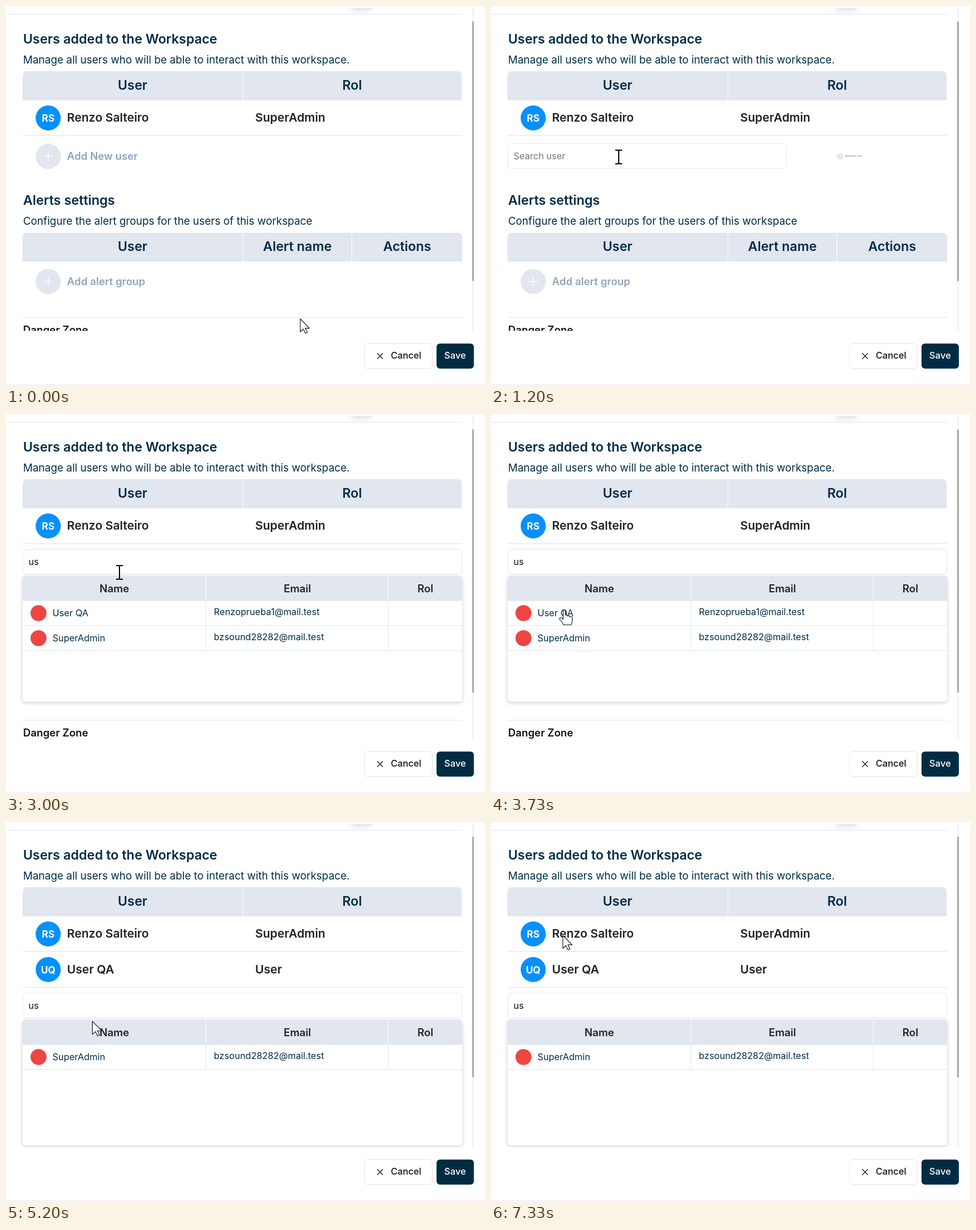
Recreate the animation shown at these times as an HTML page. Size 840x667 px, loop 7400 ms.

```html
<!DOCTYPE html>
<html lang="en">
<head>
<meta charset="utf-8">
<title>Workspace users</title>
<style>
  html, body { margin: 0; width: 100%; height: 100%; overflow: hidden; background: #fff; }
  #stage { display: block; width: 840px; height: 667px; }
  text { font: 400 16px Inter, "Open Sans", sans-serif; fill: #012b45; white-space: pre; }
  .title { font-size: 22.9px; font-weight: 600; }
  .lead { font-size: 18.5px; }
  .head { font-size: 22.8px; font-weight: 600; text-anchor: middle; }
  .person { font-size: 20.7px; font-weight: 600; fill: #212121; }
  .initials { font-weight: 700; font-size: 17px; fill: #fff; text-anchor: middle; }
  .add { font-size: 18.3px; font-weight: 600; fill: #94a3b8; }
  .danger { font-size: 18.3px; font-weight: 600; fill: #111; }
  .column { font-size: 18.4px; font-weight: 600; fill: #212529; text-anchor: middle; }
  .button { font-weight: 500; font-size: 16.2px; fill: #111; text-anchor: middle; }
  .band { fill: #e1e6ef; }
  .rule { stroke: #e1e5eb; fill: none; }
  .gap { stroke: #fff; }
  .plus { stroke: #fff; stroke-width: 1.4; }
  .avatar { fill: #0590ff; }
  .dot { fill: #ef4444; }
  .box { fill: #fff; stroke: #e1e6ef; }
  #menu > .panel { fill: #fff; filter: drop-shadow(0 2px 3px rgba(0, 0, 0, .2)); }
  #toggle { fill: #e4e4e4; filter: drop-shadow(-3px 4px 6px rgba(0, 0, 0, .07)); }
  #arrow, #hand { fill: #fff; stroke: #111; stroke-width: 1.1; stroke-linejoin: round; }
  #ibeam { fill: none; stroke: #000; stroke-width: 2; }
</style>
</head>
<body>
<svg id="stage" viewBox="0 0 840 667">
  <defs>
    <clipPath id="view"><rect y="4" width="840" height="566"/></clipPath>
    <g id="plus"><circle class="band" r="22"/><path class="plus" d="M-8 0H8M0-8V8"/></g>
  </defs>
  <rect width="840" height="667" fill="#fff"/>

  <g clip-path="url(#view)">
    <rect id="toggle" x="604" y="-15" width="41" height="22" rx="11"/>
    <path class="rule" d="M0 14.500H800"/>
    <text class="title" x="30" y="66">Users added to the Workspace</text>
    <text class="lead" x="30" y="101">Manage all users who will be able to interact with this workspace.</text>
    <path class="band" d="M29 165.500V122.500q0-8 8-8H791q8 0 8 8V165.500Z"/>
    <path class="gap" d="M415.500 114V166"/>
    <text class="head" x="222" y="147">User</text>
    <text class="head" x="607" y="147">Rol</text>

    <circle class="avatar" cx="74" cy="196.500" r="22"/>
    <text class="initials" x="74" y="203">RS</text>
    <text class="person" x="107" y="203">Renzo Salteiro</text>
    <text class="person" x="437" y="203">SuperAdmin</text>
    <path class="rule" d="M29 227.500H800"/>

    <g id="newRow">
      <circle class="avatar" cx="74" cy="259" r="22"/>
      <text class="initials" x="74" y="265.500">UQ</text>
      <text class="person" x="107" y="266">User QA</text>
      <text class="person" x="437" y="266">User</text>
      <path class="rule" d="M29 290.500H800"/>
    </g>

    <g id="addUser">
      <use href="#plus" x="74" y="264"/>
      <text class="add" x="107" y="270">Add New user</text>
    </g>

    <g id="lower">
      <text class="title" x="30" y="349">Alerts settings</text>
      <text class="lead" x="30" y="384">Configure the alert groups for the users of this workspace</text>
      <path class="band" d="M29 448.500V406q0-8 8-8H792q8 0 8 8V448.500Z"/>
      <path class="gap" d="M415.500 398V449M606.500 398V449"/>
      <text class="head" x="222" y="430">User</text>
      <text class="head" x="511" y="430">Alert name</text>
      <text class="head" x="703.500" y="430">Actions</text>
      <use href="#plus" x="74" y="483.500"/>
      <text class="add" x="107" y="490">Add alert group</text>
      <path class="rule" d="M29 546.500H800"/>
      <text class="danger" x="30" y="575">Danger Zone</text>
    </g>

    <svg id="field" x="29" height="45">
      <rect id="outline" class="box" x=".5" y=".5" height="43.500" rx="6"/>
      <text id="query" x="10.500" y="28"></text>
      <path id="caret" d="M0 11V33" stroke="#000"/>
    </svg>

    <g id="menu">
      <rect class="panel" x="29" y="284" width="771" height="221" rx="6"/>
      <path class="band" d="M29 328V290q0-6 6-6H794q6 0 6 6V328Z"/>
      <path class="gap" d="M350.500 284V328M670.500 284V328"/>
      <text class="column" x="190" y="313">Name</text>
      <text class="column" x="511" y="313">Email</text>
      <text class="column" x="735.500" y="313">Rol</text>
      <g id="match">
        <circle class="dot" cx="57" cy="349.500" r="14"/>
        <text x="81.500" y="355">User QA</text>
        <text x="364.500" y="353">Renzoprueba1@mail.test</text>
        <path class="rule" d="M29 371.500H800M350.500 328V372M670.500 328V372"/>
      </g>
      <g id="admin">
        <circle class="dot" cx="57" cy="393.500" r="14"/>
        <text x="81.500" y="399">SuperAdmin</text>
        <text x="364.500" y="397">bzsound28282@mail.test</text>
        <path class="rule" d="M29 415.500H800M350.500 372V416M670.500 372V416"/>
      </g>
    </g>

    <rect x="817" y="4" width="3.500" height="566" fill="#f3f4f6"/>
    <rect id="thumb" x="817.500" width="3" rx="1.500" fill="#a6a6a6"/>
  </g>

  <rect class="box" x="628.500" y="592.500" width="119" height="44" rx="6"/>
  <path d="M651 609.500l10 10m0-10l-10 10" stroke="#111" stroke-width="1.200"/>
  <text class="button" x="701.500" y="619">Cancel</text>
  <rect x="755" y="592.500" width="65.500" height="44" rx="6" fill="#012b42"/>
  <text class="button" x="787.500" y="619" style="fill:#fff">Save</text>
  <rect y="663" width="840" height="4" fill="#f5f6fa"/>

  <g id="pointer">
    <path id="arrow" d="M0 0V23L5.200 18 9 25.600 12.400 24.100 8.800 16.600H16.200Z"/>
    <path id="hand" d="M-2.500 2q0-2 2-2t2 2V9q4-1 4 1.500q4-1 4 1.500q4-1 4 2V19q0 3-2 7H-2q-1-3-6-9q-2-3 1-3.500q2 0 4.500 3Z"/>
    <path id="ibeam" d="M-6-12h4q2 0 2 2q0-2 2-2h4M0-11V11M-6 12h4q2 0 2-2q0 2 2 2h4"/>
  </g>
</svg>

<script>
const LOOP = 7400;
const OPEN = 730, OPENED = 1400, TYPE_U = 2130, TYPE_S = 2470, PICK = 4270;

// Pointer stops: time, x, y
const stops = [
  [0, 516, 549], [470, 223, 264], [800, 224, 265],
  [2930, 224, 265], [3000, 199, 278], [3200, 58, 330], [3470, 514, 346], [3730, 129, 344],
  [4460, 129, 344], [5270, 152, 350], [5330, 153, 351],
  [5660, 153, 351], [5800, 512, 400], [5870, 390, 440], [6000, 137, 511], [6070, 49, 570], [6200, 99, 639],
  [7200, 99, 639], [7270, 80, 475], [7330, 126, 199]
];
const shapes = [
  [0, "arrow"], [400, "hand"], [950, "ibeam"], [3070, "hand"],
  [PICK, "ibeam"], [4600, "arrow"], [6470, "none"], [7270, "arrow"]
];

const $ = id => document.getElementById(id);
const show = (id, on) => { $(id).style.display = on ? "" : "none"; };
const move = (id, x, y) => $(id).setAttribute("transform", `translate(${x} ${y})`);
const within = (t, from, to) => t >= from && t < to;
const lastAt = (list, t) => list.findLastIndex(item => item[0] <= t);

function pointerAt(t) {
  const i = lastAt(stops, t);
  const [t0, x0, y0] = stops[i];
  const [t1, x1, y1] = stops[i + 1] || [LOOP, x0, y0];
  const p = (t - t0) / (t1 - t0);
  const e = p * p * (3 - 2 * p);
  return [x0 + (x1 - x0) * e, y0 + (y1 - y0) * e];
}

// The search field widens and pushes the shrinking button to the right.
function drawSearch(t) {
  const opening = within(t, OPEN, OPENED);
  const p = (t - OPEN) / (OPENED - OPEN);
  const width = opening ? Math.min(549, 696 * p) : 770;
  const scale = opening ? Math.max(0, 1 - 1.07 * p) : 1;

  show("addUser", t < OPENED);
  const left = opening ? 30 + width : 30;
  $("addUser").setAttribute("transform",
    `translate(${left + 110.5} 264) scale(${scale}) translate(-140.5 -264)`);

  show("field", t >= OPEN && width > 2);
  $("field").setAttribute("width", width + 1);
  $("outline").setAttribute("width", width);
  $("field").setAttribute("y", t < OPENED ? 241 : t < PICK ? 237 : 300);

  const typed = t < TYPE_U ? "" : t < TYPE_S ? "u" : "us";
  $("query").textContent = typed || "Search user";
  $("query").style.fill = typed ? "#111" : "#757575";
  show("caret", within(t, 1530, 2000) || within(t, TYPE_U, 3000));
  move("caret", [11.5, 20.5, 29.5][typed.length], 0);
}

function drawPage(t) {
  const picked = t >= PICK;
  show("newRow", picked);
  move("lower", 0, picked ? 54 : t >= OPENED ? -9 : 0);
  show("menu", t >= TYPE_U);
  move("menu", 0, picked ? 63 : 0);
  show("match", !picked);
  move("admin", 0, picked ? -44 : 0);

  const [top, bottom] = picked ? [25.5, 448] : t >= OPENED ? [27, 489] : [27, 483];
  $("thumb").setAttribute("y", top);
  $("thumb").setAttribute("height", bottom - top);
}

function drawPointer(t) {
  const shape = shapes[lastAt(shapes, t)][1];
  for (const id of ["arrow", "hand", "ibeam"]) show(id, id === shape);
  move("pointer", ...pointerAt(t));
}

// Time advances at 15 steps per second, rounded to 10 ms.
function frame(now) {
  const step = Math.floor((now % LOOP + 4) * 0.015);
  const t = Math.round(step / 0.15) * 10;
  drawSearch(t);
  drawPage(t);
  drawPointer(t);
  requestAnimationFrame(frame);
}

frame(0);
</script>
</body>
</html>
```
